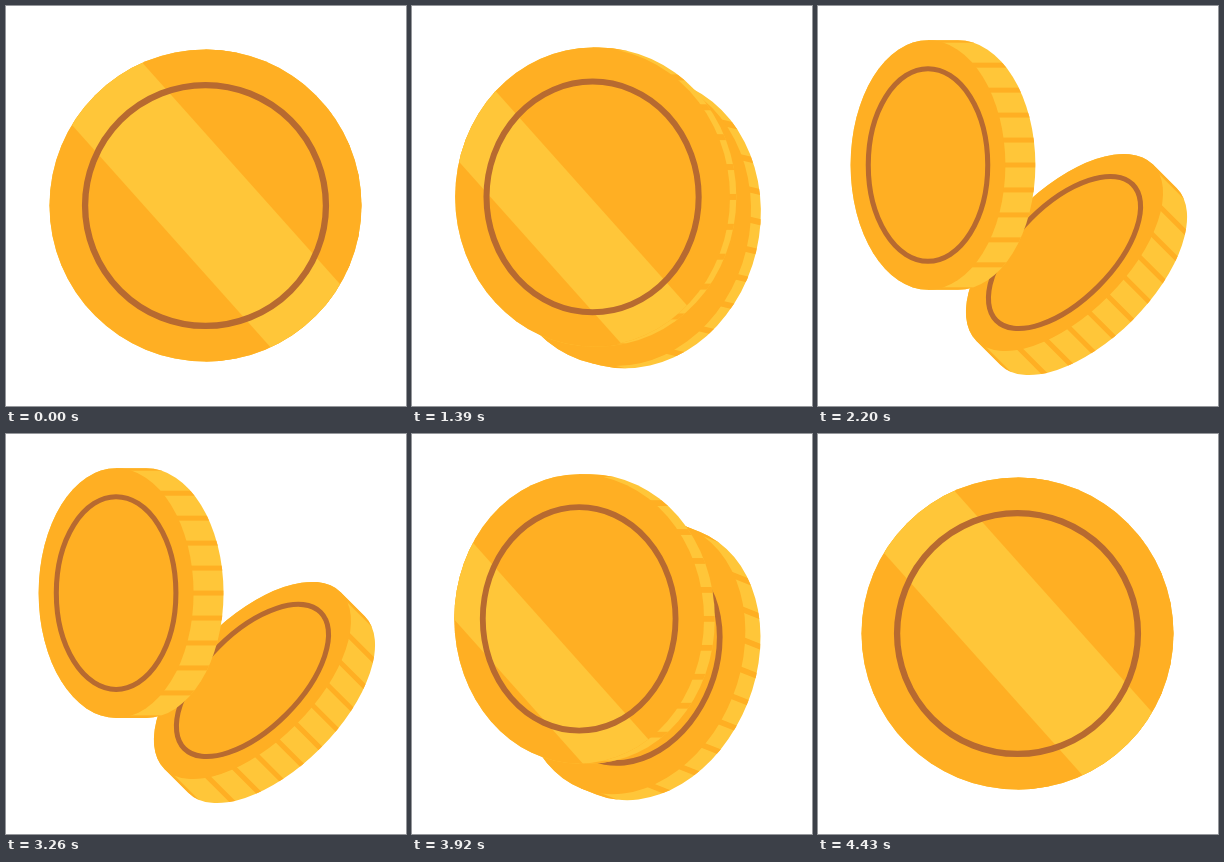
These frames come from a looping animation (400x400 px, 4460 ms). An HTML page with a canvas:

```html
<!DOCTYPE html>
<html lang="en">
<head>
<meta charset="utf-8">
<title>Two coins</title>
<style>
  html, body { margin: 0; width: 100%; height: 100%; overflow: hidden; background: #fff; }
  canvas { display: block; width: 400px; height: 400px; }
</style>
</head>
<body>
<canvas id="stage"></canvas>
<script>
const GOLD = '#ffaf23', LIGHT = '#ffc639', BROWN = '#b76a30';
const LOOP = 4460, STEP = 30, STEPS = 40, OPEN_AT = 1000, CLOSE_AT = 3230;
const RADIUS = 156, RING = 0.772, SHINE_SLOPE = 1.12;

const canvas = document.getElementById('stage');
const ctx = canvas.getContext('2d');
const ratio = window.devicePixelRatio || 1;
canvas.width = canvas.height = 400 * ratio;

const lerp = (a, b, t) => a + (b - a) * t;
const clamp = x => Math.min(1, Math.max(0, x));
const easeInOut = p => p < 0.5 ? 2 * p * p : 1 - 2 * (1 - p) ** 2;
const ahead = (e, amount) => e + amount * e * (1 - e);
const progress = (t, start) => clamp(Math.floor((t - start) / STEP) / STEPS);

function ellipse(rx, ry) {
  ctx.beginPath();
  ctx.ellipse(0, 0, rx, ry, 0, 0, 2 * Math.PI);
}

// Diagonal band between two lines y = slope * x + offset
function drawShine(upper, lower) {
  const y = (x, offset) => SHINE_SLOPE * x + offset;
  ctx.beginPath();
  ctx.moveTo(-300, y(-300, upper));
  ctx.lineTo(300, y(300, upper));
  ctx.lineTo(300, y(300, lower));
  ctx.lineTo(-300, y(-300, lower));
  ctx.fillStyle = LIGHT;
  ctx.fill();
}

function drawCoin({ x, y, angle, size, squash, depth, shine }) {
  const ry = RADIUS * size, rx = ry * squash;
  ctx.save();
  ctx.translate(x, y);
  ctx.rotate(angle);

  // Rim with grooves
  ctx.save();
  ctx.beginPath();
  ctx.ellipse(0, 0, rx, ry, 0, Math.PI / 2, Math.PI * 1.5);
  ctx.ellipse(depth, 0, rx, ry, 0, -Math.PI / 2, Math.PI / 2);
  ctx.closePath();
  ctx.fillStyle = LIGHT;
  ctx.fill();
  ctx.clip();
  ctx.fillStyle = GOLD;
  for (let i = -5; i <= 5; i++) {
    ctx.fillRect(0, ry * (i / 5 - 0.02), rx + depth, ry * 0.04);
  }
  ctx.restore();

  // Face
  ctx.save();
  ellipse(rx, ry);
  ctx.fillStyle = GOLD;
  ctx.fill();
  if (shine) {
    ctx.clip();
    const shift = SHINE_SLOPE * x - y;
    drawShine(shine[0] + shift, shine[1] + shift);
  }
  ctx.restore();

  ellipse(rx * RING, ry * RING);
  ctx.strokeStyle = BROWN;
  ctx.lineWidth = 6.3 * size;
  ctx.stroke();
  ctx.restore();
}

function backCoin(e) {
  const turn = ahead(e, 0.51);
  return {
    x: lerp(200, 246.5, ahead(e, 0.4)),
    y: lerp(199.5, 246.5, ahead(e, 0.62)),
    angle: turn * Math.PI / 4,
    size: lerp(1, 0.8, turn),
    squash: lerp(1, 0.497, turn),
    depth: 34 * turn
  };
}

function frontCoin(e) {
  return {
    x: lerp(199.5, 110, e),
    y: lerp(199.5, 159, e),
    angle: 0,
    size: lerp(1, 0.8, e),
    squash: lerp(1, 0.62, e),
    depth: 30 * e,
    shine: e < 1 && [
      -96 + 473 * e - 306 * e ** 2 + 119 * e ** 3,
      45 + 300 * e - 116 * e ** 2
    ]
  };
}

function draw(now) {
  const t = now % LOOP;
  const e = easeInOut(progress(t, OPEN_AT) - progress(t, CLOSE_AT));
  ctx.setTransform(ratio, 0, 0, ratio, 0, 0);
  ctx.clearRect(0, 0, 400, 400);
  if (e > 0) drawCoin(backCoin(e));
  drawCoin(frontCoin(e));
}

const start = performance.now();
function tick() {
  draw(performance.now() - start);
  requestAnimationFrame(tick);
}
tick();
</script>
</body>
</html>
```
